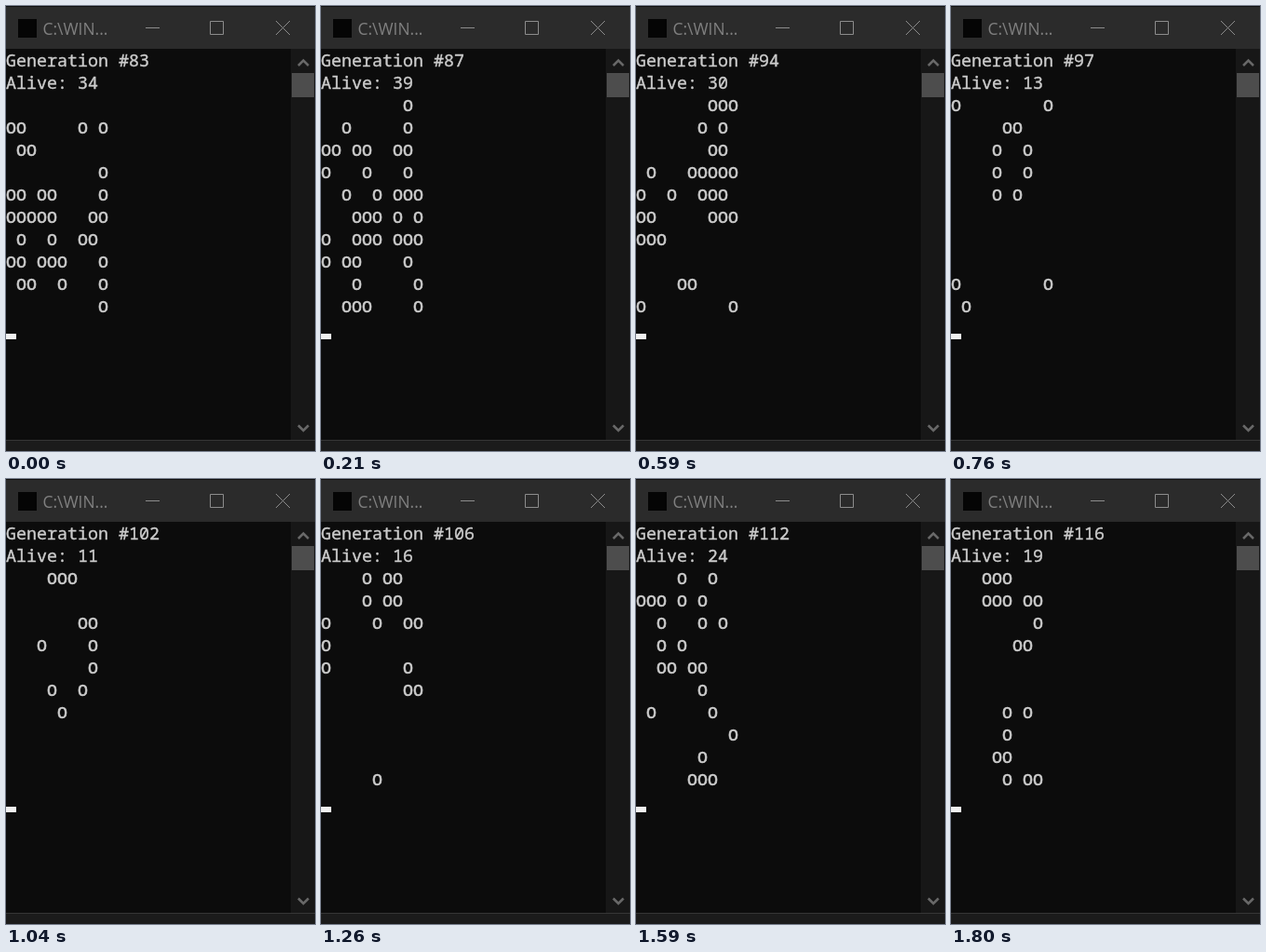
An HTML page for the animation above (1.86 s loop, 332 by 478 pixels).

```html
<!DOCTYPE html>
<html lang="en">
<head>
<meta charset="utf-8">
<title>Life in a console</title>
<style>
  html, body { margin: 0; width: 100%; height: 100%; overflow: hidden; background: #1b1b1b; }
  svg { display: block; }
  #console text {
    font: 18.333px "Noto Sans Mono", "DejaVu Sans Mono", monospace;
    fill: #ccc;
    stroke: #ccc;
    stroke-width: 0.4;
    white-space: pre;
  }
  #console .cells { font-family: "Liberation Mono", monospace; stroke-width: 0.6; }
  .title { font: 17.4px "Open Sans", "Noto Sans", sans-serif; fill: #808080; }
  .buttons { fill: none; stroke: #8c8c8c; }
  .arrows { fill: none; stroke: #686868; stroke-width: 2.5; }
</style>
</head>
<body>
<svg width="332" height="478" viewBox="0 0 332 478">
  <rect width="332" height="46" fill="#2b2b2b"/>
  <rect width="332" height="1" fill="#111"/>
  <rect x="13" y="14" width="20" height="20" fill="#050505"/>
  <text class="title" x="39.5" y="31">C:\WIN...</text>
  <g class="buttons">
    <path d="M150 23.5h15M219.5 16.5h14v14h-14z"/>
    <path d="M290 16l15 15M305 16l-15 15"/>
  </g>
  <rect y="46" width="306" height="420" fill="#0c0c0c"/>
  <rect x="306" y="46" width="26" height="420" fill="#171717"/>
  <rect x="307" y="72" width="24" height="26" fill="#4d4d4d"/>
  <path class="arrows" d="M314 64l5.5-5.5l5.5 5.5M314 450.5l5.5 5.5l5.5-5.5"/>
  <rect y="466" width="332" height="1" fill="#363636"/>
  <g id="console"></g>
  <rect y="352" width="11" height="6" fill="#f2f2f2"/>
</svg>
<script>
const SIZE = 10;
const HEADER_LINES = 2;
const FIRST_GENERATION = 83;
const SEED = [
  "          ",
  "OO     O O",
  " OO       ",
  "         O",
  "OO OO    O",
  "OOOOO   OO",
  " O  O  OO ",
  "OO OOO   O",
  " OO  O   O",
  "         O",
];
// How long each generation stays on screen, in ms.
const HOLDS = [
  40, 60, 50, 60, 50, 60, 50, 60, 60, 50, 50, 60, 50, 60, 60, 60, 50,
  60, 50, 60, 50, 60, 50, 50, 60, 50, 60, 50, 60, 50, 60, 50, 50, 60,
];
const LOOP = HOLDS.reduce((sum, hold) => sum + hold, 0);

const wrap = i => (i + SIZE) % SIZE;

// One step of Conway's rules on a board whose edges join.
function evolve(board) {
  const isAlive = (row, col) => board[wrap(row)][wrap(col)] === "O";
  const nextCell = (row, col) => {
    let block = 0;
    for (let dr = -1; dr <= 1; dr++)
      for (let dc = -1; dc <= 1; dc++) block += isAlive(row + dr, col + dc);
    return block === 3 || (block === 4 && isAlive(row, col)) ? "O" : " ";
  };
  return board.map((line, row) =>
    Array.from(line, (_, col) => nextCell(row, col)).join(""));
}

const boards = [SEED];
while (boards.length < HOLDS.length) boards.push(evolve(boards.at(-1)));

const lines = Array.from({ length: HEADER_LINES + SIZE }, (_, i) => {
  const line = document.createElementNS("http://www.w3.org/2000/svg", "text");
  line.setAttribute("y", 65 + 24 * i);
  if (i >= HEADER_LINES) line.setAttribute("class", "cells");
  return document.getElementById("console").appendChild(line);
});

function indexAt(time) {
  let index = 0;
  while (time >= HOLDS[index]) time -= HOLDS[index++];
  return index;
}

let shown = -1;
function render(time) {
  const index = indexAt(time % LOOP);
  if (index === shown) return;
  shown = index;
  const board = boards[index];
  const alive = board.join("").replaceAll(" ", "").length;
  [`Generation #${FIRST_GENERATION + index}`, `Alive: ${alive}`, ...board]
    .forEach((text, i) => { lines[i].textContent = text; });
}

function tick() {
  render(performance.now());
  requestAnimationFrame(tick);
}
tick();
</script>
</body>
</html>
```
